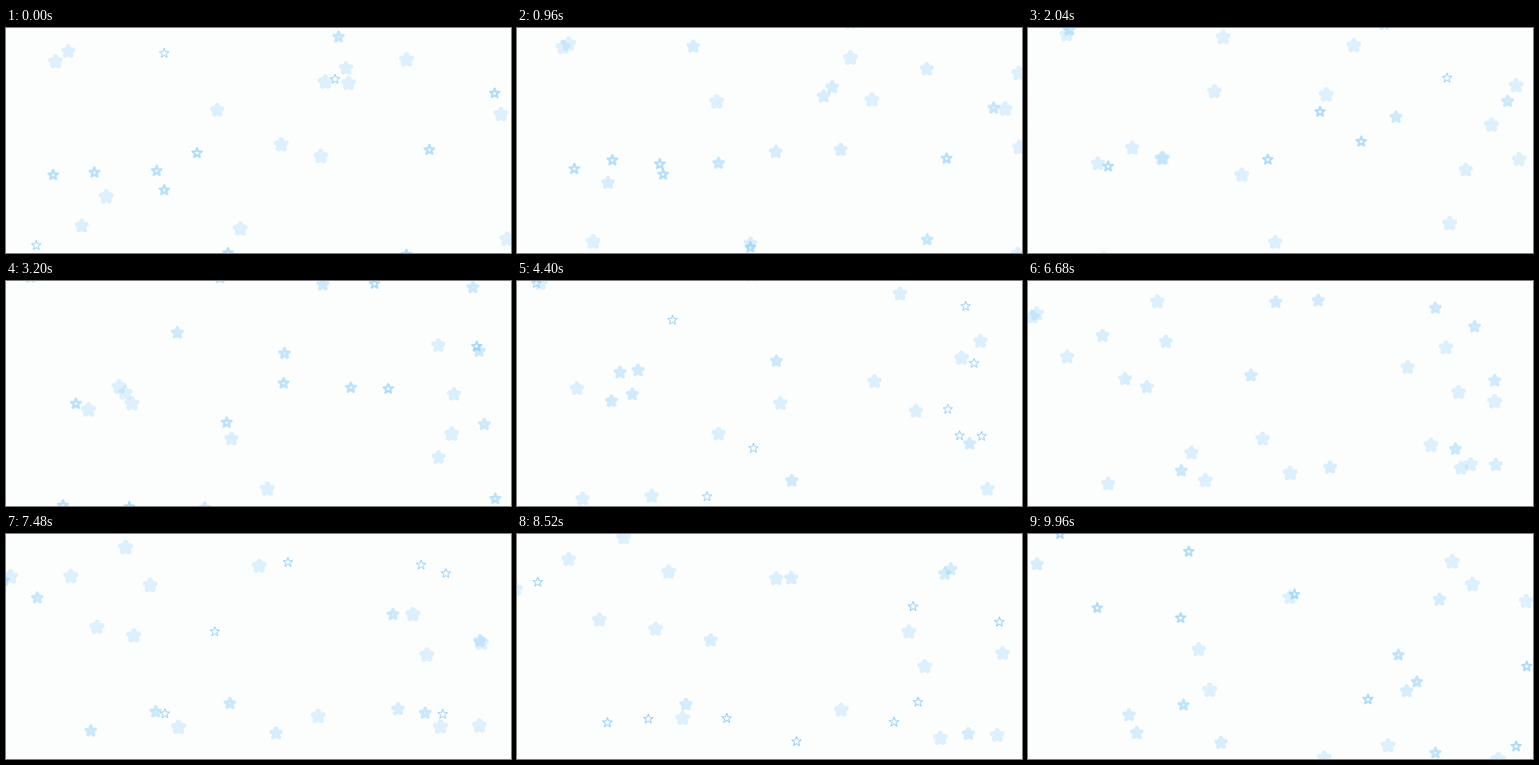
An HTML page with a canvas for the animation above (10 s loop, 600 by 268 pixels).

```html
<!DOCTYPE html>
<html lang="en">
<head>
<meta charset="utf-8">
<title>Drifting stars</title>
<style>
  html, body { margin: 0; width: 100%; height: 100%; overflow: hidden; background: #fcfefd; }
  canvas { display: block; }
</style>
</head>
<body>
<canvas id="sky" width="600" height="268"></canvas>
<script>
const ctx = document.getElementById('sky').getContext('2d');
const LOOP = 10000, STEP = 40, RADIUS = 6;

// Stars that share a pulse; thinnest at `thin`, every `period` seconds.
// Each star: x, y, speed x, speed y (pixels per second).
const groups = [
  { thin: 0, period: 3.74, stars: [
    [391, 61, -19.1, 7.4], [413.5, -83, -10.5, 15.6], [188, 30, 20.4, -11]] },
  { thin: 7.48, period: 4.6, stars: [
    [395.5, -23, 13.06, 8], [404.8, 62.8, 15.25, 20.3], [114, 309, 10, -12.7],
    [585.8, 99.8, -8.45, -7.06], [56.8, 36.8, -4.5, -18]] },
  { thin: 8.5, period: 6, stars: [
    [371.7, 149.6, 11.6, -7.43], [643, 292.8, -19.55, -10.86], [324.7, 135.6, -19.8, 9.94],
    [116.7, 197.6, -10.8, -16.47], [69, -77, -9.8, 17.5], [377, 61, -15, 18.6],
    [42.4, 291, 7.63, -7.8]] },
  { thin: 10.3, period: 4.9, stars: [
    [187.3, 192, -15.04, -19.36], [263, 267, 14.1, -7.1], [104.3, 171, 8.65, -15.14],
    [502.3, 144, 7.75, 10.86], [178.3, 169, -9.7, -8.2], [55.3, 174, 12.6, -7.5]] },
  { thin: 4.4, period: 6.4, stars: [
    [607.4, -59, -16.9, 20.25], [608, 37.3, -14.75, 13.8], [606.6, 126, -12.4, 13.4],
    [249, 95, -14.6, -11], [51.6, -61, -6.5, 14.5], [259, 300, -7.55, -9.8],
    [72, 25, -13.8, -9.9], [402, 45, -8.4, -13.3]] },
  { thin: 2.04, period: 3.85, stars: [
    [473.6, 34.5, 11.9, 12.3], [245.5, -75, 7.1, 14.7]] },
  { thin: 8.5, period: 4.1, stars: [
    [475.2, 269, 11.5, -19.27], [580, 77, -15.5, 17.25], [226.4, 148.2, 12.4, 11.6]] }
];

// Stars that soon leave through the nearest horizontal edge.
const leaving = [[36, 259], [394, 9], [88, 233], [593, 248], [276, 236]];

const star = new Path2D();
for (let i = 0; i < 10; i++) {
  const r = i % 2 ? RADIUS * 0.42 : RADIUS;
  const a = (i / 5 - 0.5) * Math.PI;
  star.lineTo(r * Math.cos(a), r * Math.sin(a));
}
star.closePath();

function drawStar(x, y, age, period) {
  const w = Math.abs(Math.sin(Math.PI * age / period));
  ctx.save();
  ctx.translate(x + 2.4 * w, y + 3.5 * w);
  ctx.lineWidth = 1 + 5.5 * w;
  ctx.globalAlpha = 0.25 + 0.65 * (1 - w) ** 2;
  ctx.stroke(star);
  ctx.restore();
}

function draw(t) {
  ctx.fillStyle = '#fcfefd';
  ctx.fillRect(0, 0, 600, 268);
  ctx.strokeStyle = 'rgb(130, 200, 250)';
  ctx.lineJoin = 'round';
  for (const { thin, period, stars } of groups) {
    for (const [x, y, vx, vy] of stars) drawStar(x + vx * t, y + vy * t, t - thin, period);
  }
  leaving.forEach(([x, y], i) => {
    drawStar(x, y + (y > 134 ? 19 : -19) * t, t + 0.9 * i, 6);
  });
}

const start = performance.now();
function tick() {
  const ms = (performance.now() - start) % LOOP;
  draw(Math.floor(ms / STEP) * STEP / 1000);
  requestAnimationFrame(tick);
}
tick();
</script>
</body>
</html>
```
